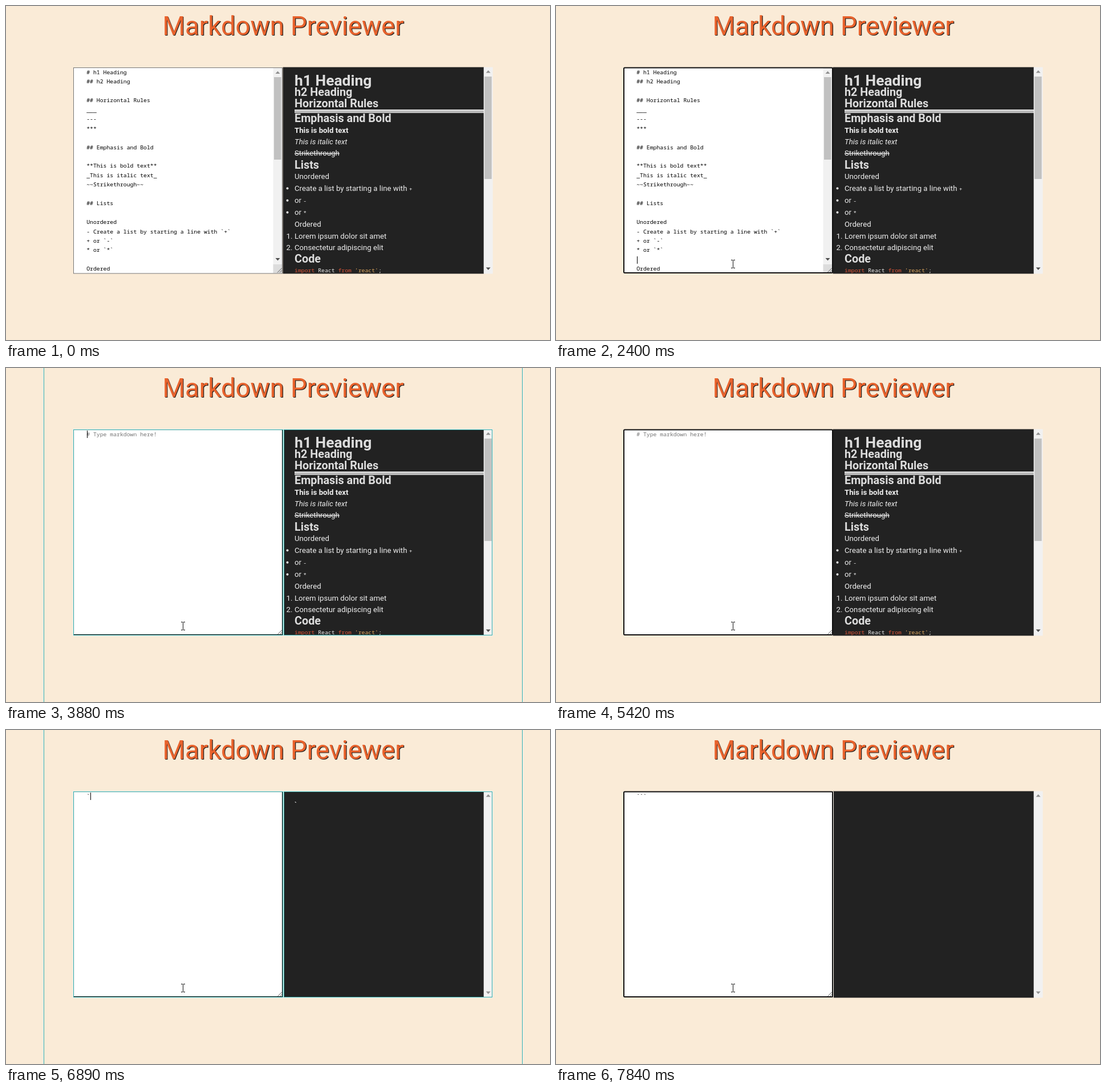
An HTML page for the animation above (7.99 s loop, 954 by 587 pixels).

```html
<!DOCTYPE html>
<html lang="en">
<head>
<meta charset="utf-8">
<title>Markdown Previewer</title>
<style>
  html, body { margin: 0; width: 100%; height: 100%; overflow: hidden; background: #faebd7; }
  svg { display: block; }
  text { white-space: pre; }
  .crisp { shape-rendering: crispEdges; }
  .title { font: 45.5px Roboto, sans-serif; }
  .mono { font: 500 9.8px "Noto Sans Mono", monospace; }
  .body { font: 13.2px Roboto, sans-serif; fill: #eee; }
  .body .h1 { font-size: 26.4px; font-weight: 700; fill: #ddd; }
  .body .h2 { font-size: 19.8px; font-weight: 700; fill: #ddd; }
  .b { font-weight: 700; }
  .i { font-style: italic; }
  .s { text-decoration: line-through; }
</style>
</head>
<body>
<svg width="954" height="587" viewBox="0 0 954 587">
  <defs>
    <clipPath id="paneClip"><rect x="486" y="108" width="352" height="362.5"/></clipPath>
  </defs>

  <text class="title" x="275.6" y="52.2" fill="#222">Markdown Previewer</text>
  <text class="title" x="274.4" y="51" fill="#e8622c">Markdown Previewer</text>

  <rect x="485.5" y="107.5" width="352.5" height="363" fill="#222"/>
  <g id="preview" class="body" clip-path="url(#paneClip)"></g>
  <text id="ticks" class="body" x="506" y="136"></text>
  <g id="paneBar"></g>
  <rect id="gap" class="crisp" x="486" y="108" width="1" height="363" fill="#f5efe6"/>

  <rect x="118" y="108" width="367" height="362" fill="#fff"/>
  <g id="editBar"></g>
  <g id="selection" class="crisp" fill="#3390ff"></g>
  <g id="source" class="mono"></g>
  <text id="typed" class="mono" x="141.2" y="119.9"></text>
  <path d="M476 468.5l8-8M480 468.5l4-4" stroke="#555" fill="none"/>
  <rect id="caret" class="crisp" width="1" height="13"/>
  <rect id="plain" x="118.5" y="108.5" width="366" height="361.5" fill="none" stroke="#767676"/>
  <rect id="focus" x="119" y="108.5" width="366" height="360.5" rx="1.5" fill="none" stroke="#101010" stroke-width="2"/>

  <g id="flash" class="crisp" fill="none"></g>

  <circle id="click" cx="308.5" cy="453" r="11.5" fill="#fdf44a" style="mix-blend-mode:multiply"/>
  <path id="beam" class="crisp" stroke="#111" fill="none"
    d="M-3 -6.5h3M1 -6.5h3M.5 -6v13M-3 7.5h3M1 7.5h3"/>
  <path id="arrow" fill="#fff" stroke="#111" d="M.5 .5v14l3.2-3 2.3 5.3 2.3-1-2.3-5.1h4.3z"/>
</svg>
<script>
const LOOP = 7990, CHAR = 5.88, ROW = 16.45;
const $ = id => document.getElementById(id);
const show = (id, on) => $(id).style.display = on ? '' : 'none';
const rect = (x, y, w, h, fill) => `<rect x="${x}" y="${y}" width="${w}" height="${h}" fill="${fill}"/>`;

// Markdown source and its selection
const lines = `# h1 Heading
## h2 Heading${' '}

## Horizontal Rules
___
---
***

## Emphasis and Bold

**This is bold text**
_This is italic text_
~~Strikethrough~~

## Lists

Unordered
- Create a list by starting a line with \`+\`
+ or \`-\`
* or \`*\`

Ordered`.split('\n');
$('source').innerHTML = lines.map((s, i) =>
  `<text x="141.2" y="${119.9 + ROW * i}">${s}</text>`).join('');
$('selection').innerHTML = lines.map((s, i) => {
  const top = Math.max(110, Math.round(107.6 + ROW * i));
  const end = Math.min(469, Math.round(107.6 + ROW * (i + 1)));
  return `<rect x="141.6" y="${top}" width="${CHAR * (s.length + 1)}" height="${end - top}"/>`;
}).join('');

// Rendered preview: baseline, style, text
const code = s => `<tspan class="mono">${s}</tspan>`;
const tint = (color, s) => `<tspan fill="${color}">${s}</tspan>`;
const blocks = [
  [140, 'h1', 'h1 Heading'],
  [158, 'h2', 'h2 Heading'],
  [178.3, 'h2', 'Horizontal Rules'],
  [204.3, 'h2', 'Emphasis and Bold'],
  [222.5, 'b', 'This is bold text'],
  [243, 'i', 'This is italic text'],
  [263.4, 's', 'Strikethrough'],
  [286, 'h2', 'Lists'],
  [304, '', 'Unordered'],
  [324.7, '', 'Create a list by starting a line with ' + code('+')],
  [346, '', 'or ' + code('-')],
  [367, '', 'or ' + code('*')],
  [388, '', 'Ordered'],
  [409, '', 'Lorem ipsum dolor sit amet'],
  [429, '', 'Consectetur adipiscing elit'],
  [451.4, 'h2', 'Code'],
  [468.2, 'mono', tint('#dc5538', 'import') + ' React ' + tint('#dc5538', 'from') + ' ' + tint('#e0a95f', "'react'") + ';']
];
$('preview').innerHTML =
  blocks.map(([y, style, s]) => `<text x="506" y="${y}" class="${style}">${s}</text>`).join('') +
  [320.5, 341.8, 362.8].map(y => `<circle cx="493.5" cy="${y}" r="2"/>`).join('') +
  '<text x="491.5" y="409">1.</text><text x="491.5" y="429">2.</text>' +
  rect(506, 182, 332, 6, '#eee') + rect(506, 184, 332, 1, '#888') + rect(506, 186, 332, 1, '#888');

// Scrollbars
const bar = (x, y, h, thumb, thumbH, id) =>
  rect(x, y, 16, h, '#f1f1f1') +
  `<path d="M${x + 4} ${y + 10}h8l-4-4.5z" fill="#8f8f8f"/>` +
  `<path id="${id}Down" d="M${x + 4} ${y + h - 11}h8l-4 4.5z" fill="#505050"/>` +
  `<g id="${id}Thumb">${rect(x + 1.5, thumb, 12.5, thumbH, '#c1c1c1')}</g>`;
$('paneBar').innerHTML = bar(837.7, 107.5, 363, 124, 180, 'pane');
$('editBar').innerHTML = bar(468.5, 109, 345, 125, 145, 'edit') + rect(468.5, 454, 16, 15.5, '#dcdcdc');

// Update outlines: coloured line with a pale line outside
const outline = (x, y, w, h) =>
  `<rect x="${x - 1}" y="${y - 1}" width="${w + 2}" height="${h + 2}" stroke="#f0f0f0"/>` +
  `<rect class="hue" x="${x}" y="${y}" width="${w}" height="${h}"/>`;
$('flash').innerHTML =
  '<path d="M119.5 468V109.5H484" stroke="#f0f0f0"/>' +
  outline(66.5, -5.5, 839, 600) + outline(118.5, 108.5, 367, 361) + outline(487.5, 108.5, 365, 361);
const hues = document.querySelectorAll('.hue');

const KEYS = [6890, 7120, 7290];
const BLINKS = [1310, 1850, 2400, 2870, 3880, 4340, 4890, 5420, 5970, 6430, 6890, 7840];
const passed = (times, t) => times.filter(x => t >= x).length;

// Progress in n held steps, the first at a and the last at b
const steps = (t, a, b, n) =>
  Math.max(0, Math.min(1, Math.floor((t - a) / (b - a) * (n - 1) + 1e-6) / (n - 1)));
const lerp = (a, b, p) => Math.round(a + (b - a) * p);

function drawPointer(t) {
  const p = steps(t, 70, 290, 4), q = steps(t, 840, 990, 3);
  const x = t < 840 ? lerp(711, 360, p) : lerp(355, 310, q);
  const y = t < 840 ? lerp(547, 413, p) : lerp(418, 453, q);
  const inEditor = x < 485 && y < 470;
  show('beam', t >= 70 && inEditor);
  show('arrow', t >= 70 && !inEditor);
  for (const id of ['beam', 'arrow']) $(id).setAttribute('transform', `translate(${x} ${y})`);
}

function draw(t) {
  const cleared = t >= 3880, keys = passed(KEYS, t), focused = t >= 1310;
  const selected = t >= 2870 && !cleared;

  show('source', !cleared);
  show('editBar', !cleared);
  show('selection', selected);
  $('source').setAttribute('fill', selected ? '#fff' : '#000');
  $('typed').textContent = keys ? '`'.repeat(keys) : cleared ? '# Type markdown here!' : '';
  $('typed').setAttribute('fill', keys ? '#000' : '#757575');

  show('plain', !focused);
  show('focus', focused);
  show('click', focused && t < 1390);
  show('caret', passed(BLINKS, t) % 2);
  $('caret').setAttribute('x', Math.round(141.8 + CHAR * keys));
  $('caret').setAttribute('y', cleared ? 110 : 440);

  show('preview', !keys);
  show('paneThumb', !keys);
  show('gap', keys);
  $('paneDown').setAttribute('fill', keys ? '#8f8f8f' : '#505050');
  $('ticks').textContent = keys < 3 ? '`'.repeat(keys) : '';

  show('flash', cleared && t < 4110 || keys && t < 7670);
  const hue = ['#37afa9', '#37afa9', '#63b19e', '#80b393'][keys];
  hues.forEach(r => r.setAttribute('stroke', hue));
  drawPointer(t);
}

function frame() {
  draw(performance.now() % LOOP);
  requestAnimationFrame(frame);
}
frame();
</script>
</body>
</html>
```
